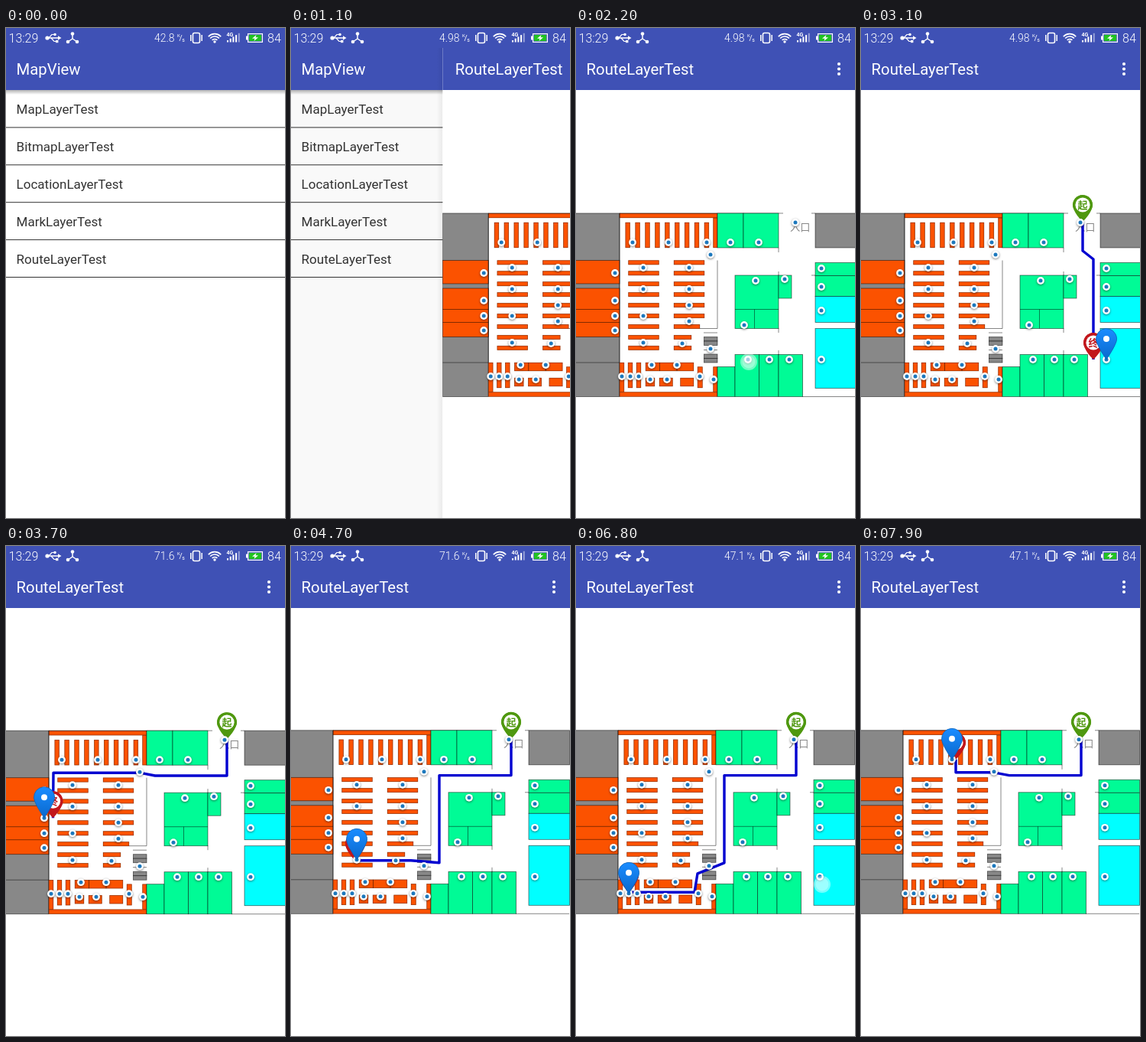
These frames come from a looping animation (365 px wide and 640 px high, 8000 ms). An HTML page with a canvas:

```html
<!DOCTYPE html>
<html lang="en">
<head>
<meta charset="utf-8">
<title>RouteLayerTest</title>
<style>
html, body { margin: 0; width: 100%; height: 100%; overflow: hidden; background: #fff; }
canvas { display: block; width: 365px; height: 640px; }
</style>
</head>
<body>
<canvas></canvas>
<script>
const W = 365, H = 640, LOOP = 8000;
const INDIGO = '#3f51b5', ORANGE = '#fb5200', GREEN = '#00fb96', GREY = '#888', CYAN = '#00ffff';
const CJK = '"Noto Sans CJK SC", "Noto Sans CJK", sans-serif';
const canvas = document.querySelector('canvas');
const ctx = canvas.getContext('2d');
const dpr = window.devicePixelRatio || 1;
canvas.width = W * dpr;
canvas.height = H * dpr;

const MARKS = [
  [74, 280], [121, 280], [171, 280], [202, 280], [239, 280], [287, 254], [176, 296], [88, 313],
  [148, 313], [51, 320], [51, 356], [51, 376], [51, 395], [88, 341], [148, 341], [148, 362],
  [88, 376], [148, 383], [88, 411], [139, 412], [176, 419], [235, 330], [273, 328], [220, 388],
  [225, 433], [253, 433], [279, 433], [321, 314], [321, 338], [321, 369], [321, 433], [99, 440],
  [132, 440], [60, 455], [71, 455], [82, 455], [97, 459], [119, 459], [162, 455], [180, 459]
];

// Routes leave the entrance and branch at shared junctions.
const START = [290, 253], GATE = [290, 300.8], WEST = [196, 300.8], SOUTH = [196, 415];
const AISLE = [176, 297], LEFT_AISLE = [63, 297];
const EAST_ROUTE = [[290, 291], [304, 302], [304, 433]];
const LOWER_ROUTE = [GATE, WEST, SOUTH, [161, 429], [157, 453.5]];
const TAPS = [
  { at: 2200, touch: [226, 436], mark: [225, 433], route: [GATE, [290, 412], [225, 412]] },
  { at: 2900, touch: [327, 452], mark: [321, 433], route: EAST_ROUTE },
  { at: 3400, touch: [52, 358], mark: [51, 356], route: [GATE, WEST, AISLE, LEFT_AISLE, [62.5, 356]] },
  { at: 3900, touch: [50, 378], mark: [51, 376], route: [GATE, WEST, AISLE, LEFT_AISLE, [62.5, 376]] },
  { at: 4400, touch: [88, 413], mark: [88, 411], route: [GATE, WEST, SOUTH, [159, 412], [86, 412]] },
  { at: 5000, touch: [118, 459], mark: [120, 458], route: [...LOWER_ROUTE, [120, 453.5]] },
  { at: 5900, touch: [70, 460], mark: [71, 455], route: [...LOWER_ROUTE, [71, 453.5]] },
  { at: 6700, touch: [322, 442], mark: [321, 433], route: EAST_ROUTE },
  { at: 7700, touch: [110, 280], mark: [121, 280], route: [GATE, WEST, AISLE, [126, 297], [126, 280]] }
];

function box(color, x0, y0, x1, y1) {
  ctx.fillStyle = color;
  ctx.fillRect(x0, y0, x1 - x0, y1 - y0);
}

function outlined(color, x0, y0, x1, y1) {
  box(color, x0, y0, x1, y1);
  ctx.strokeStyle = 'rgba(0,0,0,.6)';
  ctx.lineWidth = 0.8;
  ctx.strokeRect(x0, y0, x1 - x0, y1 - y0);
}

function shelf(x0, y0, x1, y1) {
  box(ORANGE, x0, y0, x1, y1);
  ctx.strokeStyle = 'rgba(90,25,0,.6)';
  ctx.lineWidth = 0.8;
  ctx.strokeRect(x0 + 0.2, y0 + 0.2, x1 - x0 - 0.4, y1 - y0 - 0.4);
}

function polyline(color, width, points) {
  ctx.strokeStyle = color;
  ctx.lineWidth = width;
  ctx.beginPath();
  points.forEach(([x, y]) => ctx.lineTo(x, y));
  ctx.stroke();
}

function wall(x0, y0, x1, y1) {
  polyline('rgba(0,0,0,.6)', 0.8, [[x0, y0], [x1, y1]]);
}

function polygon(color, points) {
  ctx.fillStyle = color;
  ctx.beginPath();
  points.forEach(([x, y]) => ctx.lineTo(x, y));
  ctx.fill();
}

function disc(color, x, y, r) {
  ctx.fillStyle = color;
  ctx.beginPath();
  ctx.arc(x, y, r, 0, 7);
  ctx.fill();
}

function text(string, x, y, size, color, weight = 400, family = 'Roboto, sans-serif') {
  ctx.font = `${weight} ${size}px ${family}`;
  ctx.fillStyle = color;
  ctx.fillText(string, x, y);
}

function fade(x0, y0, x1, y1, from, to) {
  const gradient = ctx.createLinearGradient(x0, y0, x1, y1);
  gradient.addColorStop(0, `rgba(0,0,0,${from})`);
  gradient.addColorStop(1, `rgba(0,0,0,${to})`);
  return gradient;
}

function header(title) {
  box(INDIGO, -3, 0, W, 81);
  text(title, 13.6, 61, 20.3, '#fff');
}

function drawList(t) {
  box('#fff', 0, 0, W, H);
  header('MapView');
  box(fade(0, 81, 0, 87, 0.3, 0), 0, 81, W, 87);
  if (t >= 800 && t < 1100) box('rgba(0,0,0,.1)', 0, 277, W, 325);
  ['Map', 'Bitmap', 'Location', 'Mark', 'Route'].forEach((name, i) => {
    text(name + 'LayerTest', 13.6, 112 + 48.9 * i, 17, '#333');
    box('#333', 0, 129.4 + 48.9 * i, W, 130.4 + 48.9 * i);
  });
  if (t >= 700 && t < 900) drawTouch([112, 302], '120,120,120');
}

function drawFloorPlan() {
  // left column
  outlined(GREY, -3, 242, 57, 481.5);
  outlined(ORANGE, -3, 303.5, 57, 334);
  outlined(ORANGE, -3, 340, 57, 403.5);
  wall(-3, 367.5, 57, 367.5);
  wall(-3, 384.5, 57, 384.5);
  wall(-3, 437, 57, 437);

  // upper shelves
  shelf(57, 242, 185, 248);
  shelf(179.5, 248, 185, 287);
  for (let i = 0; i < 9; i++) {
    const x = 64.7 + 12.9 * i, y = 303.5 + 13.95 * i;
    shelf(x, 254, x + 6, 287);
    shelf(68.5, y, 108.5, y + 5.6);
    shelf(128, y, i < 6 ? 168 : i < 7 ? 162 : 151, y + 5.6);
  }
  wall(57, 242, 57, 481);
  wall(57, 242, 271, 242);
  wall(185, 303.5, 185, 392.5);
  wall(162, 392.5, 185, 392.5);

  // stairs
  wall(167, 398, 185, 398);
  wall(167, 420.5, 185, 420.5);
  [403.5, 409, 426, 431.5].forEach(y => outlined(GREY, 167.5, y, 185, y + 5.5));

  // lower shelves
  shelf(57, 437, 63, 475.5);
  shelf(57, 475.5, 185, 481.5);
  shelf(179.5, 442.5, 185, 475.5);
  [68, 79].forEach(x => shelf(x, 437, x + 6, 470));
  shelf(159, 442.5, 165.5, 470);
  shelf(91, 437, 154, 448);
  wall(109.5, 437, 109.5, 448);
  wall(132, 437, 132, 448);
  [[91, 103], [109, 126.5], [136.5, 154]].forEach(([a, b]) => shelf(a, 457, b, 468));

  // rooms
  outlined(GREEN, 185, 242, 219, 287);
  outlined(GREEN, 219, 242, 265, 287);
  outlined(GREEN, 208, 323, 265, 392.5);
  wall(208, 367.5, 265, 367.5);
  wall(233.5, 367.5, 233.5, 392.5);
  outlined(GREEN, 265, 323, 282, 353);
  outlined(GREEN, 185, 442.5, 208, 481.5);
  outlined(GREEN, 208, 426.5, 239.5, 481.5);
  outlined(GREEN, 239.5, 426.5, 265, 481.5);
  outlined(GREEN, 265, 426.5, 296.5, 481.5);
  outlined(GREY, 313, 242, 366.5, 287);
  outlined(GREEN, 313, 306.5, 366.5, 323.5);
  outlined(GREEN, 313, 323.5, 366.5, 350.5);
  outlined(CYAN, 313, 350.5, 366.5, 384.5);
  outlined(CYAN, 313, 392.5, 366.5, 470.5);
  wall(308, 242, 313, 242);
  wall(308, 323, 313, 323);
  wall(265, 287, 265, 293);
  wall(265, 318, 265, 323);
  wall(265, 392, 265, 398);
  wall(265, 421, 265, 427);
  wall(296, 481.5, 366, 481.5);
  text('入口', 280, 264.5, 13.2, '#888', 100, CJK);
}

function drawMark([x, y]) {
  ctx.save();
  ctx.shadowColor = 'rgba(0,0,0,.5)';
  ctx.shadowBlur = 3 * dpr;
  ctx.shadowOffsetY = dpr;
  disc('#fff', x, y, 4.9);
  ctx.restore();
  disc('#1c78bd', x, y, 2.5);
}

function pinShape(x, y, r, height) {
  const cy = y - height, side = r * Math.cos(Math.PI * 0.15), low = r * Math.sin(Math.PI * 0.15);
  ctx.beginPath();
  ctx.arc(x, cy, r, Math.PI * 0.85, Math.PI * 0.15);
  ctx.quadraticCurveTo(x + r * 0.65, cy + r * 1.05, x, y);
  ctx.quadraticCurveTo(x - r * 0.65, cy + r * 1.05, x - side, cy + low);
  ctx.fill();
}

function drawLabelPin([x, y], color, glyph) {
  ctx.fillStyle = color;
  pinShape(x, y, 13, 22);
  disc(color, x, y - 22, 12.8);
  disc('#fff', x, y - 22, 9.6);
  ctx.textAlign = 'center';
  text(glyph, x, y - 17, 13, color, 700, CJK);
  ctx.textAlign = 'left';
}

function drawBluePin([x, y]) {
  const shade = ctx.createLinearGradient(x, y - 40, x, y);
  shade.addColorStop(0, '#1a8cff');
  shade.addColorStop(1, '#0a68cc');
  ctx.fillStyle = shade;
  pinShape(x, y, 13.5, 27);
  ctx.strokeStyle = '#0c62b8';
  ctx.lineWidth = 0.8;
  ctx.stroke();
  disc('#fff', x, y - 27, 4);
}

function drawTouch([x, y], rgb = '255,255,255') {
  disc(`rgba(${rgb},.45)`, x, y, 11);
  disc(`rgba(${rgb},.3)`, x, y, 8.5);
}

function drawMapPage(t) {
  box('#fff', -3, 0, W, H);
  const tap = TAPS.filter(p => t >= p.at).pop();
  const shown = TAPS.filter(p => t >= p.at + 200).pop();
  ctx.save();
  if (t >= 4000) ctx.translate(-2, -1.2);
  else if (t >= 3500) ctx.translate(-1, -0.8);
  drawFloorPlan();
  if (shown) {
    ctx.lineJoin = 'round';
    polyline('#0000d0', 3.4, [START, ...shown.route]);
    drawLabelPin(START, '#4f980f', '起');
    drawLabelPin(shown.route[shown.route.length - 1], '#c2161c', '终');
  }
  MARKS.forEach(drawMark);
  if (shown) drawBluePin(shown.mark);
  ctx.restore();
  if (tap && t < tap.at + 200) drawTouch(tap.touch);
  header('RouteLayerTest');
  [47, 53.5, 60].forEach(y => disc('#fff', 344, y, 2.1));
}

function drawStatusBar(t) {
  const white = '#fff';
  box(INDIGO, 0, 0, W, 26);
  text('13:29', 3.5, 19, 16, white, 300);
  text('84', 342, 19, 16, white, 300);
  const speed = t < 1100 ? '42.8' : t < 3500 ? '4.98' : t < 5700 ? '71.6' : '47.1';
  text(speed, 194, 18, 14, white, 300);
  text('K', 224, 12, 6, white);
  polyline(white, 0.8, [[227, 17], [230, 9]]);
  text('s', 230.3, 17.5, 7, white);

  // USB
  polyline(white, 1.5, [[53, 13], [69, 13]]);
  polyline(white, 1.2, [[56, 13], [60, 8.5], [64, 8.5]]);
  polyline(white, 1.2, [[59, 13], [63, 17.5], [66, 17.5]]);
  disc(white, 54, 13, 2.6);
  disc(white, 64, 8.5, 1.8);
  box(white, 65, 15.8, 68.4, 19.2);
  polygon(white, [[68, 10.3], [72.5, 13], [68, 15.7]]);

  // three linked nodes
  [[87, 7.5], [81, 18], [93, 18]].forEach(([x, y]) => {
    polyline(white, 1.5, [[87, 14], [x, y]]);
    disc(white, x, y, 2.3);
  });

  // vibrate
  ctx.lineWidth = 1.6;
  ctx.beginPath();
  ctx.roundRect(244.5, 6.5, 9, 13, 2);
  ctx.stroke();
  [241.8, 256.2].forEach(x => polyline(white, 1.5, [[x, 9], [x, 17]]));

  // wifi
  disc(white, 273, 18, 1.7);
  ctx.lineWidth = 1.7;
  [4.5, 8, 11.3].forEach(r => {
    ctx.beginPath();
    ctx.arc(273, 19, r, -Math.PI * 0.76, -Math.PI * 0.24);
    ctx.stroke();
  });

  // signal
  text('4G', 288.5, 11, 7, white, 700);
  for (let i = 0; i < 5; i++) {
    box(i < 4 ? white : 'rgba(255,255,255,.45)', 289 + 3.7 * i, 16 - 2.3 * i, 291 + 3.7 * i, 18.5);
  }

  // battery
  box(white, 314, 10.5, 316, 15.5);
  box(white, 316, 7, 336, 19);
  box(INDIGO, 317.2, 8.2, 334.8, 17.8);
  box('#22c322', 318, 9, 334, 17);
  polygon(white, [[327.5, 9], [322, 13.7], [325.5, 13.7], [324.5, 17], [330, 12.3], [326.5, 12.3]]);
}

function draw(now) {
  const t = Math.floor((now % LOOP) / 100) * 100; // the screen updates ten times a second
  ctx.setTransform(dpr, 0, 0, dpr, 0, 0);
  const progress = Math.min(1, Math.max(0, (t - 1010) / 500));
  const offset = W * (1 - progress) ** 3;
  if (progress < 1) drawList(t);
  if (progress > 0) {
    const edge = offset - 3;
    if (edge > 0) {
      box(`rgba(0,0,0,${0.12 * progress})`, 0, 81, edge, H);
      box(fade(edge - 8, 0, edge, 0, 0, 0.06), edge - 8, 26, edge, H);
    }
    ctx.save();
    ctx.translate(offset, 0);
    ctx.beginPath();
    ctx.rect(-3, 0, W + 3, H);
    ctx.clip();
    drawMapPage(t);
    ctx.restore();
  }
  drawStatusBar(t);
}

function tick() {
  draw(performance.now());
  requestAnimationFrame(tick);
}
tick();
</script>
</body>
</html>
```
